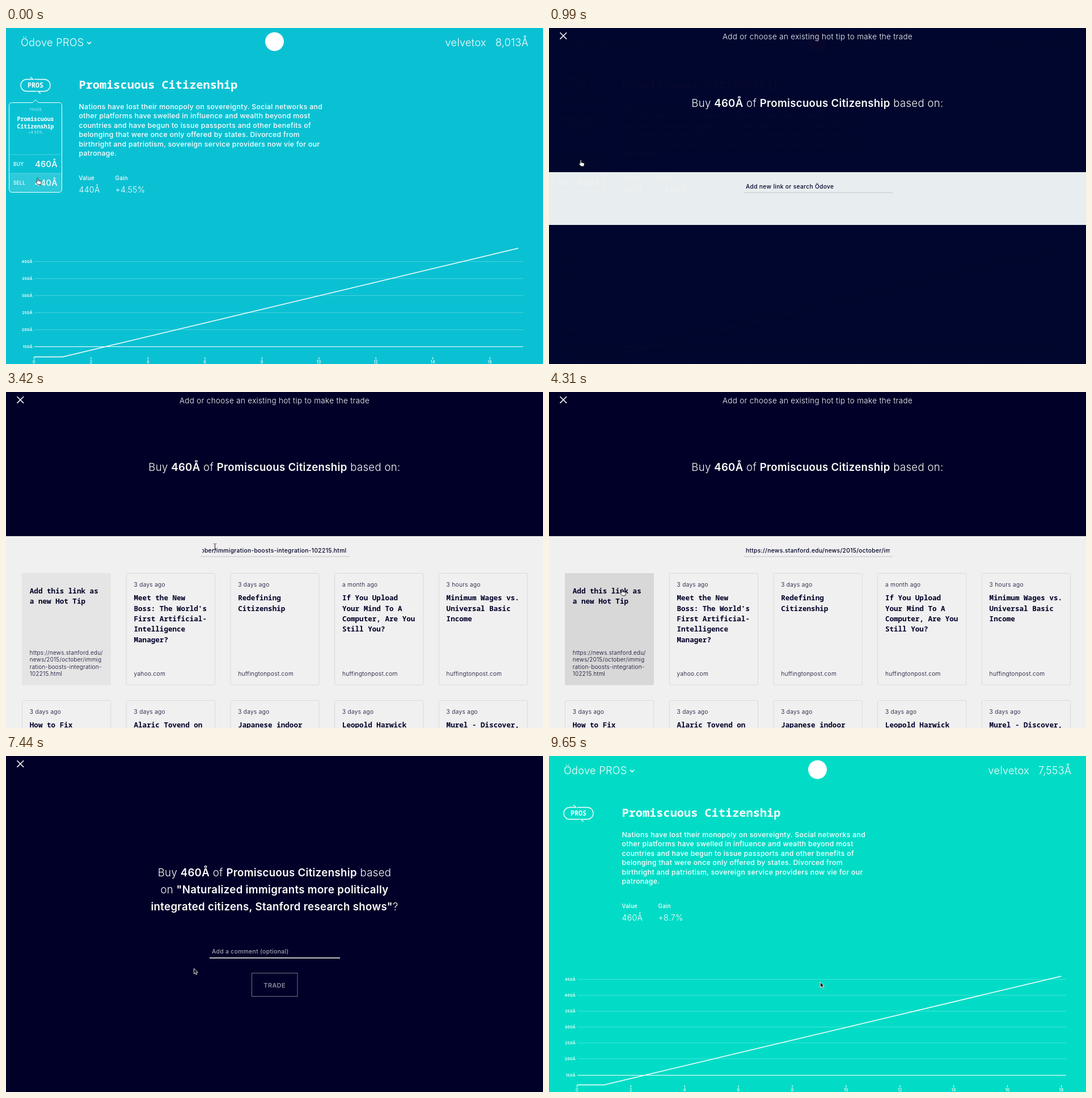
An HTML page for the animation above (9890 ms loop, 947 px wide and 592 px high).

```html
<!DOCTYPE html>
<html lang="en">
<head>
<meta charset="utf-8">
<title>Trade flow</title>
<style>
  html, body { margin: 0; width: 100%; height: 100%; overflow: hidden; background: #000028; }
  svg { display: block; width: 947px; height: 592px; font-family: Inter, "Open Sans", sans-serif; font-weight: 300; letter-spacing: .02em; }
  .mono { font-family: "Noto Sans Mono", "DejaVu Sans Mono", monospace; font-weight: 700; letter-spacing: 0; }
  .med { font-weight: 500; }
  .bold { font-weight: 600; }
  .mid { text-anchor: middle; }
  .end { text-anchor: end; }
  .line { fill: none; stroke: #fff; }
</style>
</head>
<body>
<svg id="stage" viewBox="0 0 947 592"></svg>
<script>
const LOOP = 9890, NAVY = '#000028';
const stage = document.getElementById('stage');

const text = (x, y, size, s, cls = '', attrs = '') =>
  `<text x="${x}" y="${y}" font-size="${size}" class="${cls}" ${attrs}>${s}</text>`;
const lines = (x, y, pitch, size, rows, cls) =>
  rows.map((s, i) => text(x, y + i * pitch, size, s, cls)).join('');
const rect = (x, y, w, h, attrs = '') =>
  `<rect x="${x}" y="${y}" width="${w}" height="${h}" ${attrs}/>`;
const path = (d, attrs = '') => `<path class="line" d="${d}" ${attrs}/>`;
const group = (opacity, body) => opacity ? `<g opacity="${opacity}">${body}</g>` : '';
const bold = s => `<tspan class="bold">${s}</tspan>`;

// Latest entry of a [time, ...values] list
const at = (keys, t) => keys.filter(k => k[0] <= t).pop();

const BRAND = 'Ödove';
const BEFORE = { bg: '#0ac1d3', n: 17, value: '440Å', gain: '+4.55%', cash: '8,013Å' };
const AFTER = { bg: '#02dcc6', n: 18, value: '460Å', gain: '+8.7%', cash: '7,553Å' };
const INTRO = [
  'Nations have lost their monopoly on sovereignty. Social networks and',
  'other platforms have swelled in influence and wealth beyond most',
  'countries and have begun to issue passports and other benefits of',
  'belonging that were once only offered by states. Divorced from',
  'birthright and patriotism, sovereign service providers now vie for our',
  'patronage.'];
const URL_TEXT = 'https://news.stanford.edu/news/2015/october/immigration-boosts-integration-102215.html';

// Each tip: age | title lines | site
const TIPS = [
  "4 minutes ago|Railmont's first/new trains in 20/years are bigger,/quieter, and/Italian-designed|theverge.com",
  '3 hours ago|Immigration/Battle: The High-/Stakes World of/Immigration/Reform|pbs.org',
  'a day ago|Syrians fleeing/war find new/route to Europe -/via the Arctic/Circle|theguardian.com',
  'a day ago|Seeking a Fair/Distribution of/Migrants in/Europe|nytimes.com',
  "2 days ago|The world's/refugees should/be given/international/passports|qz.com",
  '2 days ago|Almost 10,000', '2 days ago|Welcome to', '2 days ago|Video: Anti-',
  '3 days ago|The horrifying', '3 days ago|Corvy, Neld and'];
const RESULTS = [
  '',
  "3 days ago|Meet the New/Boss: The World's/First Artificial-/Intelligence/Manager?|yahoo.com",
  '3 days ago|Redefining/Citizenship|huffingtonpost.com',
  'a month ago|If You Upload/Your Mind To A/Computer, Are You/Still You?|huffingtonpost.com',
  '3 hours ago|Minimum Wages vs./Universal Basic/Income|huffingtonpost.com',
  '3 days ago|How to Fix', '3 days ago|Alaric Tovend on', '3 days ago|Japanese indoor',
  '3 days ago|Leopold Harwick', '3 days ago|Murel - Discover,'];

const LINK_ALPHA = [[0, 0], [840, .27], [990, .97], [1250, 1], [6610, .74], [6760, 0]];
const TRADE_ALPHA = [[0, 0], [6610, .18], [6760, 1], [9650, 0]];
const POINTER = [
  [0, 'hand', 52, 264], [120, 'hand', 52, 239], [360, 'hand', 52, 232],
  [1490, 'arrow', 103, 233], [1730, 'arrow', 180, 247], [1850, 'arrow', 268, 260],
  [1960, 'arrow', 335, 269], [2080, 'beam', 366, 267],
  [3690, 'arrow', 352, 282], [3810, 'arrow', 290, 305], [3930, 'hand', 212, 330],
  [4050, 'hand', 150, 343], [4160, 'hand', 125, 347],
  [7030, 'arrow', 128, 347], [7290, 'arrow', 198, 363], [7440, 'arrow', 331, 374],
  [7560, 'arrow', 420, 388], [7680, 'arrow', 466, 395], [7800, 'arrow', 485, 395],
  [8100, 'hand', 481, 393], [8210, 'hand', 477, 390], [8330, 'hand', 475, 397],
  [9650, 'arrow', 478, 398]];
const SHAPES = {
  hand: '<path d="M3 7V1.4a1 1 0 0 1 2 0V5l4 .8q1.6.4 1.3 2L9.6 11.8H4.4L.8 7.4Q1.4 5.8 3 7z" fill="#fff" stroke="#111" stroke-width=".9"/>',
  arrow: '<path d="M.4.5V9.8L2.6 7.8 4.2 11.3 5.8 10.6 4.3 7.2H7.2z" fill="#000" stroke="#fff" stroke-width=".9"/>',
  beam: '<path d="M0 .5h1.5l1 1 1-1H5M2.5 1.5V10M0 11h1.5l1-1 1 1H5" fill="none" stroke="#222"/>'
};

function chart(n) {
  const px = i => 49.5 + i * 854 / n;
  const py = v => 579.5 - (v - 120) * 191.5 / (20 * n - 20);
  let out = '';
  for (let v = 150; v <= 20 * n + 100; v += 50) {
    const y = Math.round(py(v)) - .5;
    out += path(`M50 ${y}H912`, `opacity="${v > 150 ? .25 : 1}"`) +
      text(47, y + 2.5, 6.7, v + 'Å', 'bold end');
  }
  for (let i = 0; i <= n; i += 2) {
    out += path(`M${px(i)} 580v4`) + text(px(i), 591, 7, i, 'med mid');
  }
  return out + path(`M${px(0)} 579.5H${px(1)}L${px(n)} 388`, 'stroke-width="1.5"');
}

function tradeCard(hover) {
  const shade = { buy: 'M6 223H98V256H6z', sell: 'M6 256H98V284.5a5 5 0 0 1-5 5H11a5 5 0 0 1-5-5z' }[hover];
  return `<path d="${shade}" opacity=".14"/>` +
    path('M47 131.5l5-5 5 5H93.5a5 5 0 0 1 5 5V284.5a5 5 0 0 1-5 5H10.5a5 5 0 0 1-5-5V136.5a5 5 0 0 1 5-5z') +
    path('M6 223H98M6 256H98', 'opacity=".25"') +
    text(52, 146, 6.6, 'TRADE', 'mid', 'opacity=".8"') +
    lines(52, 164, 12.7, 9.85, ['Promiscuous', 'Citizenship'], 'mono mid') +
    text(52, 186, 6.5, BEFORE.gain, 'mid') +
    text(13, 243, 8.4, 'BUY', 'med') + text(91, 245, 14.6, '460Å', 'med end') +
    text(13, 276, 8.4, 'SELL', 'med') + text(91, 278, 14.6, '440Å', 'med end');
}

function page(p, hover) {
  return rect(0, 0, 947, 592, `fill="${p.bg}"`) + '<g fill="#fff">' +
    text(26, 32, 18.1, BRAND + ' PROS') + path('M143 24.5l3.6 3.4 3.6-3.4', 'stroke-width="1.6"') +
    '<circle cx="473.5" cy="24" r="16.5"/>' +
    text(847, 32, 18.1, 'velvetox', 'end') + text(921.5, 32, 18, p.cash, 'end') +
    path('M54 111.5H36.5a10.5 10.5 0 0 1 0-21H48l-5-4M50 90.5H67.5a10.5 10.5 0 0 1 0 21H56l5 4', 'stroke-width="1.3"') +
    text(52, 105, 11.6, 'PROS', 'mono mid') +
    text(128.5, 107, 20.3, 'Promiscuous Citizenship', 'mono') +
    lines(128.5, 143, 16.46, 12.28, INTRO, 'med') +
    text(128.5, 267.5, 9.8, 'Value', 'med') + text(192.5, 267.5, 9.8, 'Gain', 'med') +
    text(128.5, 290, 14.1, p.value) + text(192.5, 290, 14.1, p.gain) +
    chart(p.n) + (hover ? tradeCard(hover) : '') + '</g>';
}

const closeIcon = path('M19.5 8l11.6 11.6M31.1 8l-11.6 11.6', 'stroke-width="1.5"');
const deal = `Buy ${bold('460Å')} of ${bold('Promiscuous Citizenship')} based`;

function tip(entry, i) {
  const x = 28.5 + i % 5 * 183.7, y = i < 5 ? 319.5 : 543.5;
  const [age, title, site = ''] = entry.split('|');
  return rect(x, y, 156.3, 196.5, 'rx="2" fill="none" stroke="#dadadd"') +
    text(x + 13.3, y + 23.3, 10.2, age) +
    lines(x + 13.3, y + 47.7, 18.4, 12.6, title.split('/'), 'mono') +
    text(x + 13.3, y + 180.5, 10.2, site);
}

function newTip(hovered) {
  return rect(28, 319, 157, 197.5, `rx="2" fill="${hovered ? '#d8d8d8' : '#e5e5e5'}"`) +
    lines(41.8, 354.7, 18.4, 12.6, ['Add this link as', 'a new Hot Tip'], 'mono') +
    lines(41.8, 463, 12.4, 9.9,
      ['https://news.stanford.edu/', 'news/2015/october/immig', 'ration-boosts-integration-', '102215.html']);
}

function linkField(t) {
  if (t < 3030) {
    const caret = t >= 2320 && t < 2800 ? rect(347, 272, 1, 13) : '';
    return text(347, 282.5, 10.25, 'Add new link or search ' + BRAND, 'med') + caret;
  }
  // While focused the field is scrolled to the end of the address
  const [x, cls] = t < 4310 ? [600.5, 'med end'] : [347, 'med'];
  return `<g clip-path="url(#field)">${text(x, 282.5, 10.25, URL_TEXT, cls)}</g>`;
}

function linkModal(t) {
  const loaded = t >= 1250, searched = t >= 3420;
  let cards = '';
  if (searched) cards = newTip(t >= 4050) + RESULTS.map((r, i) => i ? tip(r, i) : '').join('');
  else if (loaded) cards = TIPS.map(tip).join('');
  return rect(0, 0, 947, 592, `fill="${NAVY}"`) +
    rect(0, 254, 947, loaded ? 338 : 93, 'fill="#f0f0f0"') + closeIcon +
    `<g fill="#fff">${text(473.5, 20, 13.5, 'Add or choose an existing hot tip to make the trade', 'mid')}` +
    text(473.5, 139, 18.6, deal + ' on:', 'mid') + '</g>' +
    `<clipPath id="field">${rect(346, 268, 255, 20)}</clipPath>` +
    `<g fill="${NAVY}">${linkField(t)}${rect(343, 289.5, 263, 1, 'fill="#c6c6cb"')}${cards}</g>`;
}

function tradeModal(t) {
  const pressed = t >= 8810 && t < 8930;
  return rect(0, 0, 947, 592, `fill="${NAVY}"`) + closeIcon + '<g fill="#fff">' +
    lines(473.5, 211.5, 30.4, 18.65, [
      deal,
      'on ' + bold('"Naturalized immigrants more politically'),
      bold('integrated citizens, Stanford research shows"') + '?'], 'mid') +
    text(363, 348, 10.35, 'Add a comment (optional)', 'med', 'opacity=".65"') +
    rect(359, 355, 230, 1.5) +
    rect(433.5, 382.5, 80.5, 41, `fill-opacity="${pressed ? .15 : 0}" stroke="#fff" stroke-opacity="${pressed ? 1 : .45}"`) +
    text(473.7, 407.7, 11, 'TRADE', 'bold mid', `opacity="${t >= 7950 ? 1 : .55}"`) + '</g>';
}

function pointer(t) {
  const [, kind, x, y] = at(POINTER, t);
  return `<g transform="translate(${x} ${y})">${SHAPES[kind]}</g>`;
}

function scene(t) {
  const hover = t < 360 ? 'sell' : t < 1250 ? 'buy' : '';
  const link = at(LINK_ALPHA, t)[1], trade = at(TRADE_ALPHA, t)[1];
  return page(t < 9650 ? BEFORE : AFTER, hover) +
    group(link, linkModal(t)) + group(trade, tradeModal(t)) + pointer(t);
}

let shown = '';
function frame() {
  const next = scene(performance.now() % LOOP);
  if (next !== shown) stage.innerHTML = shown = next;
  requestAnimationFrame(frame);
}
frame();
</script>
</body>
</html>
```
